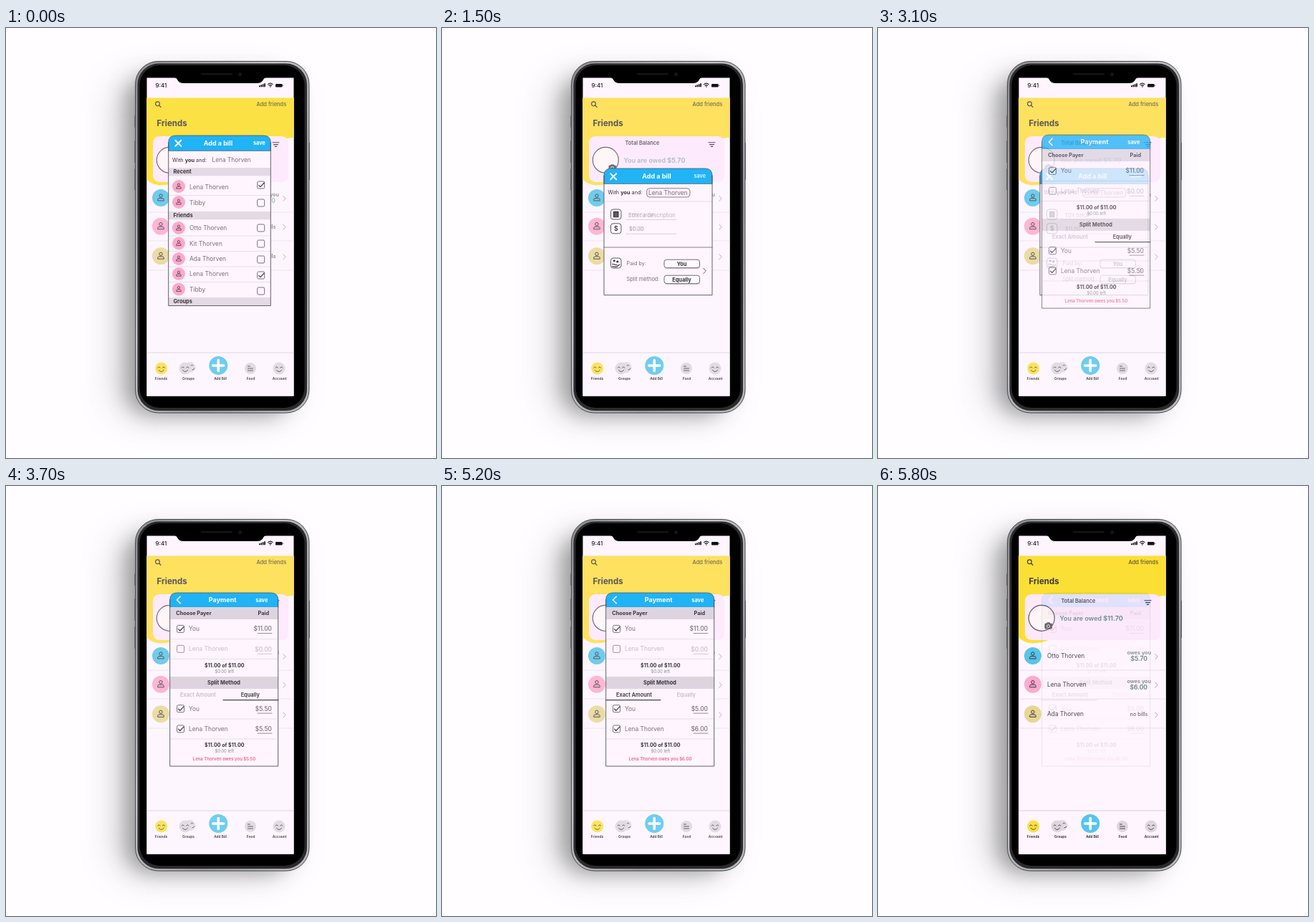
Recreate the animation shown at these times as an HTML page. Size 600x600 px, loop 5900 ms.

```html
<!DOCTYPE html>
<html lang="en">
<head>
<meta charset="utf-8">
<title>Split a bill</title>
<style>
  html, body { margin: 0; width: 100%; height: 100%; overflow: hidden; background: #fffdff; }
  svg { display: block; width: 100vw; height: 100vh; }
  text { font-family: Montserrat, Inter, "Open Sans", sans-serif; white-space: pre; }
</style>
</head>
<body>
<svg id="stage" viewBox="0 0 600 600"></svg>
<script>
const LOOP = 5900, STEP = 100;
const INK = '#39343b', MID = '#77707a', PALE = '#c6bdc8', LINE = '#e3dae5';
const PAGE = '#fef5ff', BLUE = '#20b3f6', PINK = '#fca9cd', BAR = '#ddd4df';
const FAMILY = 'Thorven';
const PAL = 'Lena ' + FAMILY;

// Drawing helpers
const text = (x, y, str, size, weight = 400, fill = INK, anchor = 'start') =>
  `<text x="${x}" y="${y}" font-size="${size}" font-weight="${weight}" fill="${fill}" text-anchor="${anchor}">${str}</text>`;
const mid = (x, y, str, size, weight, fill) => text(x, y, str, size, weight, fill, 'middle');
const end = (x, y, str, size, weight, fill) => text(x, y, str, size, weight, fill, 'end');
const rect = (x, y, w, h, fill, rx = 0, extra = '') =>
  `<rect x="${x}" y="${y}" width="${w}" height="${h}" rx="${rx}" fill="${fill}" ${extra}/>`;
const circle = (x, y, r, fill, extra = '') => `<circle cx="${x}" cy="${y}" r="${r}" fill="${fill}" ${extra}/>`;
const path = (d, stroke = INK, width = 1, fill = 'none') =>
  `<path d="${d}" stroke="${stroke}" stroke-width="${width}" fill="${fill}" stroke-linecap="round" stroke-linejoin="round"/>`;
const rule = (x1, x2, y, color = LINE, width = .8) => path(`M${x1} ${y}H${x2}`, color, width);
const group = (id, body) => `<g id="${id}">${body}</g>`;

const avatar = (x, y, r, fill) => {
  const k = r / 12;
  return circle(x, y, r, fill) +
    `<g transform="translate(${x} ${y}) scale(${k})">` +
    circle(0, -3, 2.2, 'none', `stroke="${INK}" stroke-width="1"`) +
    path('M-4.3 3.6V2.6Q-4.3 .6 -2 .6H2Q4.3 .6 4.3 2.6V3.6Z') + '</g>';
};
const checkbox = (x, y, on, color = MID) =>
  rect(x - 5, y - 5, 10, 10, 'none', 1.8, `stroke="${color}" stroke-width="1"`) +
  (on ? path(`M${x - 3} ${y + .3}L${x - .8} ${y + 2.6}L${x + 4.5} ${y - 3}`, INK, 1.1) : '');
const chevron = (x, y, s = 3.5, color = '#aaa2ad', dir = 1) =>
  path(`M${x - dir * s / 2} ${y - s}L${x + dir * s / 2} ${y}L${x - dir * s / 2} ${y + s}`, color, s > 4 ? 1.7 : 1);
const cross = (x, y) => path(`M${x - 4} ${y - 4}l8 8m0 -8l-8 8`, '#fff', 2);

const panel = (x, y, w, h, head, title, saveX, saveWeight) =>
  path(`M${x} ${y + h}V${y + 10}Q${x} ${y} ${x + 10} ${y}H${x + w - 10}Q${x + w} ${y} ${x + w} ${y + 10}V${y + h}Z`, 'none', 0, PAGE) +
  path(`M${x} ${y + head}V${y + 10}Q${x} ${y} ${x + 10} ${y}H${x + w - 10}Q${x + w} ${y} ${x + w} ${y + 10}V${y + head}Z`, '#4b5660', .8, BLUE) +
  mid(x + w / 2 - 2, y + head / 2 + 3, title, 9, 700, '#fff') +
  end(saveX, y + head / 2 + 2.6, 'save', 7.4, saveWeight, '#fff');
const frame = (x, y, w, h) =>
  path(`M${x} ${y + 10}V${y + h}H${x + w}V${y + 10}`, '#56505a', .9);

// Phone body
function phone() {
  const side = (x, y, h) => rect(x, y, 3, h, '#77777c', 1);
  return `<defs>
    <filter id="soft" x="-40%" y="-30%" width="180%" height="160%"><feGaussianBlur stdDeviation="14"/></filter>
    <filter id="wide" x="-50%" y="-30%" width="200%" height="160%"><feGaussianBlur stdDeviation="24"/></filter>
    <linearGradient id="metal" x1="0" x2="1" y1="0" y2="1">
      <stop offset="0" stop-color="#8a8a8e"/><stop offset=".4" stop-color="#c5c5c9"/>
      <stop offset=".7" stop-color="#98989d"/><stop offset="1" stop-color="#bcbcc0"/>
    </linearGradient>
    <clipPath id="view"><rect x="196.5" y="69.5" width="205" height="444"/></clipPath></defs>` +
    rect(0, 0, 600, 600, '#fffdff') +
    rect(148, 66, 252, 480, '#777', 40, 'opacity=".22" filter="url(#wide)"') +
    rect(167, 66, 232, 474, '#555', 36, 'opacity=".5" filter="url(#soft)"') +
    side(179, 122, 17) + side(179, 157, 31) + side(179, 196, 31) + side(421, 160, 52) +
    rect(180.5, 46.5, 242.5, 490.5, 'url(#metal)', 32, 'stroke="#48484c" stroke-width="1"') +
    rect(183.5, 49.5, 236.5, 484.5, '#2b2b2e', 29.5) +
    rect(186.5, 52, 230, 478, '#000', 28);
}

function statusBar() {
  let bars = '';
  for (let i = 0; i < 4; i++) bars += rect(353 + i * 2.4, 80.2 - i, 1.7, 2 + i, '#111', .3);
  return path('M235 69H363Q360 69.5 359 72Q357 77 350 77H248Q241 77 239 72Q238 69.5 235 69Z', 'none', 0, '#000') +
    rect(272, 63, 44, 2.6, '#151517', 1.3) + circle(326.5, 64.5, 2.6, '#11131d') +
    text(208.5, 83, '9:41', 8, 500, '#222') + bars +
    path('M365.6 78.6Q368.8 75.8 372 78.6M367 80.4Q368.8 79 370.6 80.4', '#111', 1.2) +
    circle(368.8, 82, .8, '#111') + rect(376, 78, 9.6, 4.5, '#111', 1.2) + rect(386.1, 79.4, 1, 1.7, '#555', .4);
}

function face(x, y, fill) {
  return circle(x, y, 8.5, fill) +
    path(`M${x - 5} ${y - 1}q1.7 -2.6 3.4 0m3.2 0q1.7 -2.6 3.4 0M${x - 3.6} ${y + 2.3}q3.6 4.6 7.2 0`, '#4a4343', 1);
}

function navBar() {
  const labels = [['Friends', 216.5], ['Groups', 254.5], ['Add Bill', 299], ['Feed', 341.5], ['Account', 381.7]];
  return rule(196, 402, 453, '#cfc6d1') + face(216.7, 475, '#fcdf3c') +
    circle(257, 473.5, 7.5, '#e2dae2') +
    path('M258 471q1.5 -2 3 0m-1 6q2 0 3 -2', '#4a4343', 1) + face(250, 475, '#ddd4de') +
    circle(296.3, 471, 13, '#52c4ee') + path('M296.3 463.5v15m-7.5 -7.5h15', '#fff', 3.6) +
    circle(341, 475, 8, '#ddd4de') + path('M337.5 472h3m-3 3h7m-7 3h7', '#4a4343', 1) +
    face(381, 475, '#ddd4de') +
    labels.map(([s, x]) => mid(x, 491, s, 4.8, 700, INK)).join('');
}

function home(id, total, rows, money) {
  const tints = ['#54c3e8', PINK, '#e6d691'];
  const first = ['Otto', 'Lena', 'Ada'];
  const list = rows.map((sum, i) => {
    const y = [237, 276.7, 318.3][i];
    return avatar(216, y, 12, tints[i]) + text(236, y + 3, first[i] + ' ' + FAMILY, 8.4, 400, INK) +
      (sum ? end(381, y - 2.2, 'owes you', 7.3, 600, '#777f83') + end(376, y + 7, sum, 8.4, 700, money)
           : end(376.5, y + 3, 'no bills', 7.3, 600, MID)) +
      chevron(388.5, y + 1) + rule(196, 402, [257, 297, 338][i]);
  }).join('');
  return group(id, rect(196, 97.5, 206, 417, PAGE) +
    `<path class="sun" fill="#fcdf2f" d="M196 97.5H402V153.5Q396 151.5 388 156L300 170C262 185 258 219.5 214 219.5Q200 217.5 196 210Z"/>` +
    circle(211.5, 105.8, 2.9, 'none', `stroke="${INK}" stroke-width="1.1"`) + path('M213.7 108l2.4 2.4', INK, 1.2) +
    end(391.3, 109, 'Add friends', 7.5, 500, '#5d5231') + text(210.5, 136.5, 'Friends', 11.5, 700, INK) +
    rect(205, 151, 189, 64, '#fde7fc', 9) +
    circle(228.3, 184.3, 18, '#fff5f6', 'stroke="#57515a" stroke-width="1.2"') +
    rect(232.5, 191.5, 10.5, 8, '#57515a', 1.5) + rect(235.5, 190.3, 4.5, 3, '#57515a', 1) +
    circle(237.7, 195.6, 2, '#57515a', 'stroke="#fff" stroke-width=".9"') +
    text(255.5, 163.3, 'Total Balance', 7.4, 600, '#514a53') +
    text(253.5, 187.5, `<tspan font-weight="600">You are owed</tspan> ${total}`, 9, 700, money) +
    path('M372 159.8h9m-7.5 2.8h6m-4.2 2.8h2.4', INK, 1.1) + list + navBar());
}

const withLine = (x, y) => text(x, y, 'With <tspan font-weight="700">you</tspan> and:', 7.3, 400, INK);

function friendList() {
  const rows = [[222, 219, PAL, 1], [244, 244, 'Tibby', 0], [279, 279, 'Otto ' + FAMILY, 0],
    [300.5, 301, 'Kit ' + FAMILY, 0], [322, 323, 'Ada ' + FAMILY, 0], [343, 345, PAL, 1], [364.5, 367, 'Tibby', 0]];
  const bars = [[195, 'Recent'], [256, 'Friends'], [376, 'Groups']];
  return group('list', panel(226.7, 150, 142.6, 237.5, 21, 'Add a bill', 362, 700) + cross(240.3, 160.8) +
    withLine(232, 187) + text(287.5, 187, PAL, 8.3, 400, MID) +
    bars.map(([y, s]) => rect(227, y, 142, 11.3, '#e3dae5') + text(233.5, y + 8.2, s, 7.4, 700, INK)).join('') +
    rows.map(([y, box, name, on]) => avatar(241, y - (y < 250 ? 1 : 0), 9, PINK) +
      text(256, y + 3, name, 8.4, 400, MID) + checkbox(355.7, box, on)).join('') +
    [233.5, 290, 311.5, 333, 354.5].map(y => rule(227, 369, y)).join('') + frame(226.7, 150, 142.6, 237.5));
}

function billForm() {
  const key = y => rect(235.5, y, 14.5, 14, '#fffaff', 3.5, 'stroke="#5b555e" stroke-width="1"');
  const button = (y, s) => rect(310.5, y + 1, 49.5, 11.5, '#cbc1cd', 3.5) +
    rect(310, y, 49.5, 11.5, '#fffaff', 3.5, 'stroke="#625b65" stroke-width=".9"') + mid(334.5, y + 8.6, s, 7.4, 700, INK);
  return group('bill', panel(226, 196, 151, 176.7, 21, 'Add a bill', 368, 500) + cross(239.2, 207.3) +
    withLine(231.5, 232.3) + rect(285.7, 223.7, 60.3, 12.3, '#fbf0fc', 4, 'stroke="#7b747e" stroke-width=".9"') +
    text(288, 232.7, PAL, 8.4, 400, MID) + rule(226, 377, 242, '#ddd4df') +
    key(253) + rect(239, 255.8, 7.5, 8.5, INK, .6) + path('M240.7 258.3h4m-4 2h4m-4 2h4', '#ddd', .5) +
    key(272.8) + mid(242.8, 283, '$', 8.8, 600, INK) +
    group('blank', text(260, 263.5, 'Enter a description', 7.4, 400, '#99919c') + text(261, 283, '$0.00', 7.2, 400, '#99919c')) +
    group('typed', text(260, 263.5, 'TOY SHOP', 7.2, 400, MID) + text(261, 283, '$11.00', 7.2, 400, MID)) +
    rule(257, 327, 267.4, '#d0c7d2') + rule(257, 327, 287.3, '#d0c7d2') + rule(226, 377, 306, '#79727c', .9) +
    key(321) + circle(240.3, 324.8, 1.5, INK) + circle(244.8, 326, 1.6, INK) +
    path('M237.5 329.5h2.5l2 1h2.3m-6.8 2l3 .7h3l4.2 -3', INK, 1.2) +
    text(257.5, 331.3, 'Paid by:', 7.3, 400, MID) + button(323.2, 'You') +
    text(257.5, 353, 'Split method:', 7.4, 400, MID) + button(345.2, 'Equally') +
    chevron(366.5, 339, 3.8, '#615a64') + frame(226, 196, 151, 176.7));
}

function payment() {
  const person = (y, name, on, color) => checkbox(243.6, y, on, on ? MID : '#99919c') + text(255, y + 2.8, name, 8.4, 400, color);
  const sum = (y, s, color) => end(371, y + 3, s, 8.4, 500, color) + rule(351, 371, y + 6.4, color, .8);
  const check = y => mid(304.8, y, '$11.00 of $11.00', 7.1, 700, INK) + mid(304.8, y + 8.2, '$0.00 left', 5.9, 400, '#87919a');
  const split = (id, exact, a, b) => group(id,
    mid(268, 294, 'Exact Amount', 7.4, 600, exact ? INK : PALE) + mid(340.7, 294, 'Equally', 7.4, 600, exact ? PALE : INK) +
    (exact ? rule(229, 305, 298.6, '#4b454e', 1.2) : rule(303, 380, 298.6, '#4b454e', 1.2)) +
    sum(310.7, a, MID) + sum(338.7, b, MID) + mid(304.5, 383.3, `${PAL} owes you ${b}`, 6, 600, '#ed6384'));
  return group('pay', panel(228.7, 149, 151, 242, 20, 'Payment', 365.3, 700) + chevron(240.8, 159, 4.6, '#fff', -1) +
    rect(229, 169, 150.5, 17, BAR) + text(237.3, 180, 'Choose Payer', 7.3, 700, INK) + end(367, 180, 'Paid', 7.3, 700, INK) +
    person(199.4, 'You', 1, MID) + sum(199.2, '$11.00', MID) + rule(229, 379, 213.5) +
    person(227.3, PAL, 0, PALE) + sum(228, '$0.00', PALE) + rule(229, 379, 241.3) + check(253) +
    rect(229, 266, 150.5, 17, BAR) + mid(304, 277.3, 'Split Method', 7.4, 700, INK) +
    person(310.7, 'You', 1, MID) + rule(229, 379, 325) + person(338.9, PAL, 1, MID) + rule(229, 379, 353) + check(364) +
    split('equal', false, '$5.50', '$5.50') + split('exact', true, '$5.00', '$6.00') + frame(228.7, 149, 151, 242));
}

const stage = document.getElementById('stage');
stage.innerHTML = phone() + `<g clip-path="url(#view)">` + rect(196, 69, 206, 445, PAGE) +
  home('before', '$5.70', ['$5.70', '', ''], '#9ab5b8') +
  rect(196, 97.5, 206, 417, '#fff6ff', 0, 'opacity=".16"') +
  friendList() + billForm() + payment() +
  home('after', '$11.70', ['$5.70', '$6.00', ''], '#638486') + '</g>' + statusBar();

// Each dissolve: start time, then its progress at every step
const FADES = {
  bill: [200, .6, 1],
  typed: [1300, .08, .18, .33, .75, 1],
  pay: [2900, .1, .4, .78, .95, 1],
  exact: [4300, .1, .4, .78, .95, 1],
  after: [5600, .1, .5, .88]
};
function progress(name, t) {
  const [start, ...levels] = FADES[name];
  const i = Math.floor((t - start) / STEP);
  return i < 0 ? 0 : levels[Math.min(i, levels.length - 1)];
}
const fade = (id, value) => {
  const node = document.getElementById(id);
  node.style.opacity = value;
  node.style.display = value > 0 ? '' : 'none';
};
const sun = document.querySelector('#before .sun');

function draw(t) {
  const bill = progress('bill', t), typed = progress('typed', t);
  const pay = progress('pay', t), exact = progress('exact', t);
  fade('list', 1 - bill);
  fade('bill', pay < 1 ? bill : 0);
  fade('blank', 1 - typed);
  fade('typed', typed);
  fade('pay', pay);
  fade('equal', 1 - exact);
  fade('exact', exact);
  fade('after', progress('after', t));
  sun.style.fill = bill < 1 ? '#fbdc20' : '#fcdc40';
}

const origin = performance.now();
function tick() {
  draw((performance.now() - origin) % LOOP);
  requestAnimationFrame(tick);
}
tick();
</script>
</body>
</html>
```
